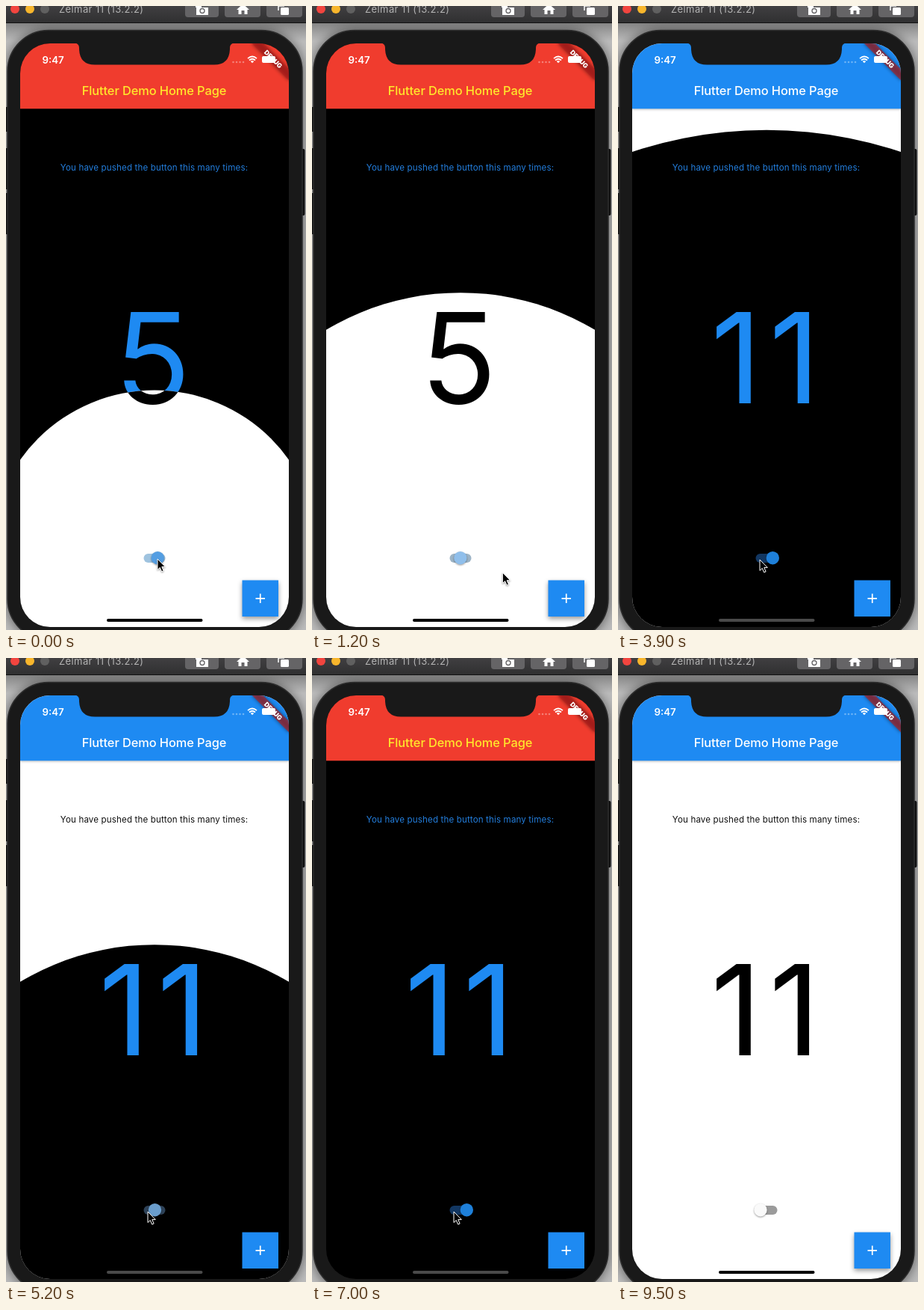
Animation of 402x834 px, one loop 9.6 s. Source, as an HTML page:

```html
<!DOCTYPE html>
<html lang="en">
<head>
<meta charset="utf-8">
<title>Theme reveal</title>
<style>
html, body { margin: 0; width: 100%; height: 100%; overflow: hidden; background: #bdbdbd; }
svg { display: block; width: 402px; height: 834px; font-family: Inter, Roboto, sans-serif; }
.mid { text-anchor: middle; }
.title { font-size: 16.4px; font-weight: 500; letter-spacing: -.08px; }
.note { font-size: 11.6px; letter-spacing: .13px; }
.count { font-size: 168px; letter-spacing: 10px; }
.bar { filter: drop-shadow(0 1px 1.5px #0004); }
.raised { filter: drop-shadow(0 3px 3px #0006); }
.thumb { filter: drop-shadow(0 1px 1px #0006); }
</style>
</head>
<body>
<svg viewBox="0 0 402 834">
  <defs>
    <linearGradient id="top" x2="0" y2="1"><stop stop-color="#403f41"/><stop offset="1" stop-color="#303031"/></linearGradient>
    <linearGradient id="shade" x2="0" y2="1"><stop stop-opacity=".3"/><stop offset="1" stop-opacity="0"/></linearGradient>
    <clipPath id="screen"><rect x="19" y="50" width="360" height="780" rx="40"/></clipPath>
    <clipPath id="reveal"><circle id="hole" cx="199" cy="734.500"/></clipPath>
    <filter id="soft" x="-30%" y="-100%" width="160%" height="300%"><feGaussianBlur stdDeviation="2.6"/></filter>
  </defs>

  <rect width="402" height="834" fill="#bdbdbd"/>
  <rect y="23" width="402" height="24" fill="url(#shade)"/>
  <g fill="#161616">
    <rect x="-2" y="135" width="6" height="33" rx="1"/>
    <rect x="-2" y="190" width="6" height="55" rx="1"/>
    <rect x="-2" y="250" width="6" height="55" rx="1"/>
    <rect x="394" y="191" width="6.500" height="89" rx="2"/>
  </g>
  <rect x="2" y="32.500" width="395" height="815" rx="55" fill="#191919" stroke="#2c2c2c" stroke-width="1.500" style="filter:drop-shadow(0 1px 8px #0008)"/>

  <g clip-path="url(#screen)">
    <g id="themes"></g>
    <g transform="translate(379 50) rotate(45)">
      <rect x="-35" y="24.400" width="70" height="10.400" opacity=".5" filter="url(#soft)"/>
      <rect x="-35" y="24.400" width="70" height="10.400" fill="#b71c1c" fill-opacity=".627"/>
      <text class="mid" y="32.800" font-size="8.700" font-weight="900" fill="#fff">DEBUG</text>
    </g>
    <path d="M92 49.500Q98 50 98 56V58Q99 78.600 119 78.600H279Q299 78.600 300 58V56Q300 50 306 49.500Z" fill="#191919"/>
    <g fill="#fff">
      <text x="48.500" y="76.500" font-size="13.300" font-weight="600">9:47</text>
      <g opacity=".35">
        <circle cx="304.500" cy="75" r="1.300"/><circle cx="309" cy="75" r="1.300"/>
        <circle cx="313.500" cy="75" r="1.300"/><circle cx="318" cy="75" r="1.300"/>
      </g>
      <rect x="343" y="67" width="18" height="9" rx="2"/>
      <path d="M330 76.300L327.800 74Q330 72.200 332.200 74Z"/>
      <path d="M324 70.200Q330 64.800 336 70.200M326 72.500Q330 69 334 72.500" fill="none" stroke="#fff" stroke-width="1.700"/>
    </g>
  </g>

  <rect width="402" height="22" fill="url(#top)"/>
  <rect y="22" width="402" height="1" fill="#111"/>
  <circle cx="12" cy="4" r="6" fill="#f2453f"/>
  <circle cx="32" cy="4" r="6" fill="#f8b62c"/>
  <circle cx="52" cy="4" r="6" fill="#606060"/>
  <text x="71" y="9" font-size="13" letter-spacing=".4" fill="#b4b4b4">Zelmar 11 (13.2.2)</text>
  <g fill="#656466">
    <rect x="240" y="-8" width="45" height="23" rx="4"/>
    <rect x="293" y="-8" width="48" height="23" rx="4"/>
    <rect x="349" y="-8" width="48" height="23" rx="4"/>
  </g>
  <g fill="#fff">
    <path d="M254 -2H262V2H271V12H255V2H254Z"/>
    <circle cx="263" cy="6.500" r="3" fill="none" stroke="#656466" stroke-width="1.300"/>
    <path d="M309 5L317.500 -3L326 5H323.500V11H319.500V6H315.500V11H311.500V5Z"/>
    <path d="M365 6V0H373" fill="none" stroke="#fff" stroke-width="1.500"/>
    <rect x="368" y="2" width="11" height="10" rx="1.500"/>
  </g>

  <path id="cursor" d="M0 0V14.500L3.300 11.500L5.700 17L8.100 16L5.800 10.600H10.300Z" stroke="#fff" style="filter:drop-shadow(0 1px 1px #0006)"/>
</svg>

<script>
const LOOP = 9600, REVEAL = 300, RADIUS = 705;
// Moments of toggling, alternately to light and to dark
const toggles = [-93, 500, 1051.5, 3659, 4370, 5051.5, 5750, 6450, 7750];
const taps = [1550, 1750, 1950, 2150, 2350, 2550];
// Pointer stops: time, x, y
const stops = [[0, 203, 739], [1060, 203, 739], [1200, 255, 757], [1430, 338, 788],
  [2620, 338, 788], [2900, 235, 729], [3350, 190, 740], [LOOP, 190, 740]];
const POINTER_END = 8350;

const light = { page: '#fff', bar: '#1e8af2', title: '#fff', note: '#111', count: '#000', home: '#000',
  thumb: [[250, 250, 250], [30, 128, 218]], track: [[155, 155, 155], [160, 208, 245]] };
const dark = { page: '#000', bar: '#f03c2e', title: '#ffe82b', note: '#237ddb', count: '#1e8af2', home: '#4a4a4a',
  thumb: [[189, 189, 189], [30, 128, 218]], track: [[77, 77, 77], [18, 55, 98]] };

const $ = id => document.getElementById(id);
const mix = (a, b, k) => a + (b - a) * k;
const mixColor = ([a, b], k) => `rgb(${a.map((v, i) => mix(v, b[i], k))})`;

function build(c) {
  const g = document.createElementNS('http://www.w3.org/2000/svg', 'g');
  g.innerHTML = `
    <rect x="19" y="50" width="360" height="780" fill="${c.page}"/>
    <rect class="bar" x="19" y="50" width="360" height="87.300" fill="${c.bar}"/>
    <text class="mid title" x="198.500" y="119" fill="${c.title}">Flutter Demo Home Page</text>
    <text class="mid note" x="198.500" y="220" fill="${c.note}">You have pushed the button this many times:</text>
    <text class="mid count" x="202.500" y="531" fill="${c.count}"></text>
    <rect class="track" x="184.500" y="732" width="29" height="12" rx="6"/>
    <circle class="thumb" cy="737.700" r="8.700"/>
    <rect class="raised" x="316.500" y="767.500" width="48.500" height="48.500" fill="#1e8af2"/>
    <rect class="glow" x="316.500" y="767.500" width="48.500" height="48.500" fill="#ddd"/>
    <path d="M334.500 791.800H347M340.750 785.500V798" stroke="#fff" stroke-width="1.700"/>
    <rect x="135" y="819" width="128.500" height="4" rx="2" fill="${c.home}"/>`;
  $('themes').append(g);
  const [count, track, thumb, glow] = ['.count', '.track', '.thumb', '.glow'].map(s => g.querySelector(s));
  return {
    g,
    draw(n, on, shine) {
      count.textContent = n;
      track.setAttribute('fill', mixColor(c.track, on));
      thumb.setAttribute('fill', mixColor(c.thumb, on));
      thumb.setAttribute('cx', mix(191, 207.3, on));
      glow.setAttribute('opacity', shine);
    }
  };
}
const views = [build(light), build(dark)];

function draw(t) {
  const last = toggles.filter(s => s <= t).length - 1;
  const age = t - toggles[last], side = last % 2, revealing = age < REVEAL;
  const front = views[side], back = views[1 - side];
  const slide = Math.min(1, age / 225) ** 1.6;

  const done = taps.filter(s => s <= t);
  const n = 5 + done.length;
  const shine = done.length ? Math.max(0, .32 * (1 - (t - done.at(-1)) / 700)) : 0;
  front.draw(n, side ? slide : 1 - slide, shine);
  back.draw(n, 1 - side, shine);

  if ($('themes').lastChild !== front.g) $('themes').append(front.g);
  back.g.removeAttribute('clip-path');
  back.g.setAttribute('visibility', revealing ? 'visible' : 'hidden');
  front.g.setAttribute('visibility', 'visible');
  front.g.setAttribute('clip-path', 'url(#reveal)');
  $('hole').setAttribute('r', revealing ? RADIUS * age / REVEAL : 900);

  const i = stops.findIndex(s => s[0] > t);
  const [t0, x0, y0] = stops[i - 1], [t1, x1, y1] = stops[i];
  const k = (t - t0) / (t1 - t0);
  $('cursor').setAttribute('transform', `translate(${mix(x0, x1, k)} ${mix(y0, y1, k)})`);
  $('cursor').setAttribute('visibility', t < POINTER_END ? 'visible' : 'hidden');
}

const start = performance.now();
function tick() {
  draw((performance.now() - start) % LOOP);
  requestAnimationFrame(tick);
}
tick();
</script>
</body>
</html>
```
